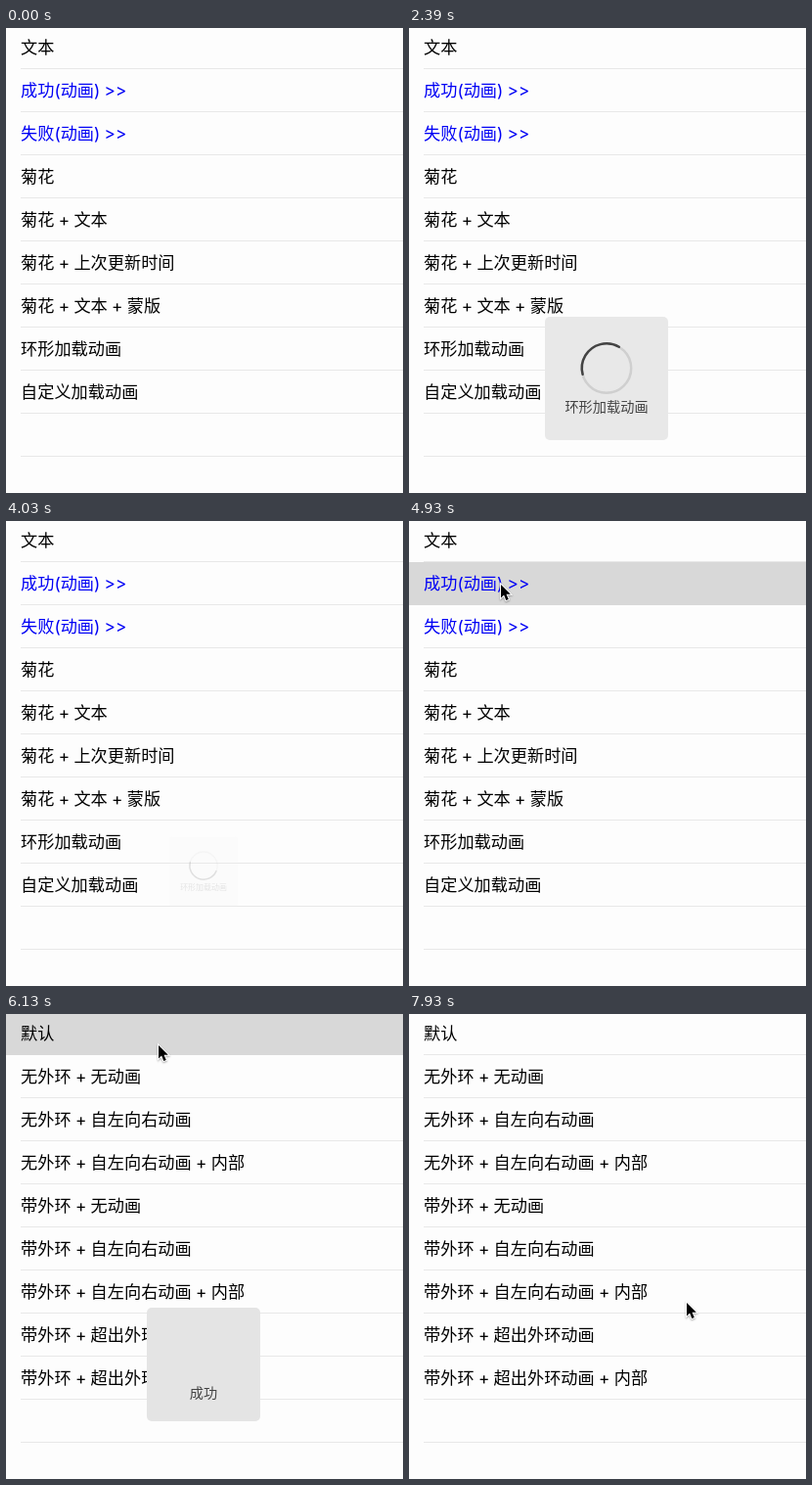
These frames come from a looping animation (406 by 475 pixels, 8 s). An HTML page with a canvas:

```html
<!DOCTYPE html>
<html lang="zh">
<head>
<meta charset="utf-8">
<style>
html, body { margin: 0; width: 100%; height: 100%; overflow: hidden; background: #fdfdfd; }
canvas { display: block; width: 406px; height: 475px; }
</style>
</head>
<body>
<canvas id="stage"></canvas>
<script>
const W = 406, H = 475, ROW = 44, LOOP = 8000;
const canvas = document.getElementById('stage');
const ctx = canvas.getContext('2d');
const dpr = window.devicePixelRatio || 1;
canvas.width = W * dpr;
canvas.height = H * dpr;

const FONT = 'Inter, "Noto Sans CJK SC", "Noto Sans CJK", sans-serif';
const INK = '#434343', PAPER = '#fdfdfd', LINE = '#e8e8e8', PRESSED = '#d8d8d8';
const RING = { x: 202, y: 347.5, r: 25.2 };

const MENU = ['文本', '成功(动画) >>', '失败(动画) >>', '菊花', '菊花 + 文本',
  '菊花 + 上次更新时间', '菊花 + 文本 + 蒙版', '环形加载动画', '自定义加载动画'];
const STYLES = ['默认', '无外环 + 无动画', '无外环 + 自左向右动画', '无外环 + 自左向右动画 + 内部',
  '带外环 + 无动画', '带外环 + 自左向右动画', '带外环 + 自左向右动画 + 内部',
  '带外环 + 超出外环动画', '带外环 + 超出外环动画 + 内部'];

// Pointer strokes: [time, x, y], each visible until its end time
const TRAILS = [
  { end: 450, keys: [[150, 107, 330], [300, 6, 330]] },
  { end: LOOP, keys: [[4180, 1, 150], [4330, 40, 104], [4480, 76, 74], [4630, 93, 64],
    [5380, 93, 64], [5830, 155, 31], [6280, 155, 31], [6880, 389, 167],
    [7180, 350, 220], [7630, 283, 294]] }
];

const clamp = v => Math.max(0, Math.min(1, v));
const ramp = (t, a, b) => clamp((t - a) / (b - a));
const rad = deg => deg * Math.PI / 180;

function hold(t) {
  const slip = t < 2380 ? 0 : 20;
  return Math.floor((t + slip) / 150) * 150 - slip;
}

function text(str, x, y, size, color) {
  ctx.font = `${size}px ${FONT}`;
  ctx.fillStyle = color;
  ctx.fillText(str, x, y);
}

function list(items, x, pressed, blue) {
  ctx.fillStyle = PAPER;
  ctx.fillRect(x, 0, W, H);
  ctx.fillStyle = LINE;
  for (let i = 0; i < 10; i++) ctx.fillRect(x + 15, i * ROW + 41, W, 1);
  if (pressed >= 0) {
    ctx.fillStyle = PRESSED;
    ctx.fillRect(x, pressed * ROW - 2, W, ROW);
  }
  ctx.textAlign = 'left';
  ctx.wordSpacing = '-0.5px';
  items.forEach((s, i) =>
    text(s, x + 15, i * ROW + 26, 17.2, blue && (i === 1 || i === 2) ? '#0000f5' : '#000'));
}

function arc(from, to, color) {
  ctx.strokeStyle = color;
  ctx.beginPath();
  ctx.arc(RING.x, RING.y, RING.r, rad(from), rad(to));
  ctx.stroke();
}

function spinner(t) {
  const d = t - 1050;
  const start = 60 + 0.35 * d;
  const span = 156 + 21 * Math.cos(2 * Math.PI * d / 2680);
  arc(0, 360, '#cfcfcf');
  arc(start, start + span, INK);
}

function tick(t) {
  const ring = ramp(t, 6180, 6580), mark = ramp(t, 6480, 6860);
  if (ring > 0) arc(-90, -90 + 360 * ring, INK);
  if (mark <= 0) return;
  const first = clamp(mark / 0.36), rest = clamp((mark - 0.36) / 0.64);
  ctx.beginPath();
  ctx.moveTo(190, 348);
  ctx.lineTo(190 + 9 * first, 348 + 9 * first);
  if (rest > 0) ctx.lineTo(199 + 16 * rest, 357 - 18 * rest);
  ctx.stroke();
}

function hud(t, shown, hidden, size, fill, label, icon) {
  const p = Math.min(ramp(t, shown, shown + 140), 1 - ramp(t, hidden, hidden + 150));
  if (p <= 0) return;
  const s = 0.5 + 0.5 * p;
  ctx.save();
  ctx.globalAlpha = p;
  ctx.translate(202, 358);
  ctx.scale(s, s);
  ctx.translate(-202, -358);
  ctx.fillStyle = fill;
  ctx.beginPath();
  ctx.roundRect(202 - size / 2, 358 - size / 2, size, size, 5);
  ctx.fill();
  ctx.lineWidth = 2.5;
  ctx.lineCap = ctx.lineJoin = 'round';
  icon(t);
  ctx.textAlign = 'center';
  text(label, 202, 392.4, 14.2, INK);
  ctx.restore();
}

function pointer(t) {
  const trail = TRAILS.find(r => t >= r.keys[0][0] && t < r.end);
  if (!trail) return;
  const k = trail.keys;
  let i = 0;
  while (i < k.length - 2 && t >= k[i + 1][0]) i++;
  const [t0, x0, y0] = k[i], [t1, x1, y1] = k[i + 1];
  const f = ramp(t, t0, t1);
  ctx.save();
  ctx.translate(x0 + (x1 - x0) * f, y0 + (y1 - y0) * f);
  ctx.beginPath();
  [[1, 1], [1, 14.5], [4.1, 11.6], [6.3, 17], [8.8, 16], [6.5, 10.8], [10.8, 10.8]]
    .forEach(([x, y]) => ctx.lineTo(x, y));
  ctx.closePath();
  ctx.shadowColor = 'rgba(0,0,0,0.35)';
  ctx.shadowBlur = 2 * dpr;
  ctx.shadowOffsetY = dpr;
  ctx.strokeStyle = '#fff';
  ctx.lineWidth = 2;
  ctx.stroke();
  ctx.shadowColor = 'transparent';
  ctx.fillStyle = '#000';
  ctx.fill();
  ctx.restore();
}

function pushOffset(t) {
  const d = 0.028 * Math.max(0, t - 4980);
  const x = W * (1 + d) * Math.exp(-d);
  return x < 1 ? 0 : Math.round(x);
}

function draw(t) {
  ctx.setTransform(dpr, 0, 0, dpr, 0, 0);
  const x = pushOffset(t);
  const within = (a, b) => t >= a && t < b;
  if (x > 0) {
    const pressed = within(750, 1050) ? 7 : within(4930, 5380) ? 1 : -1;
    list(MENU, -0.3 * (W - x), pressed, true);
  }
  if (x < W) list(STYLES, x, within(5980, 6280) ? 0 : -1, false);
  hud(t, 750, 3898, 126, '#e8e8e8', '环形加载动画', spinner);
  hud(t, 5980, 7498, 116, '#e4e4e4', '成功', tick);
  pointer(t);
}

const begin = performance.now();
function loop() {
  draw(hold((performance.now() - begin) % LOOP));
  requestAnimationFrame(loop);
}
loop();
</script>
</body>
</html>
```
